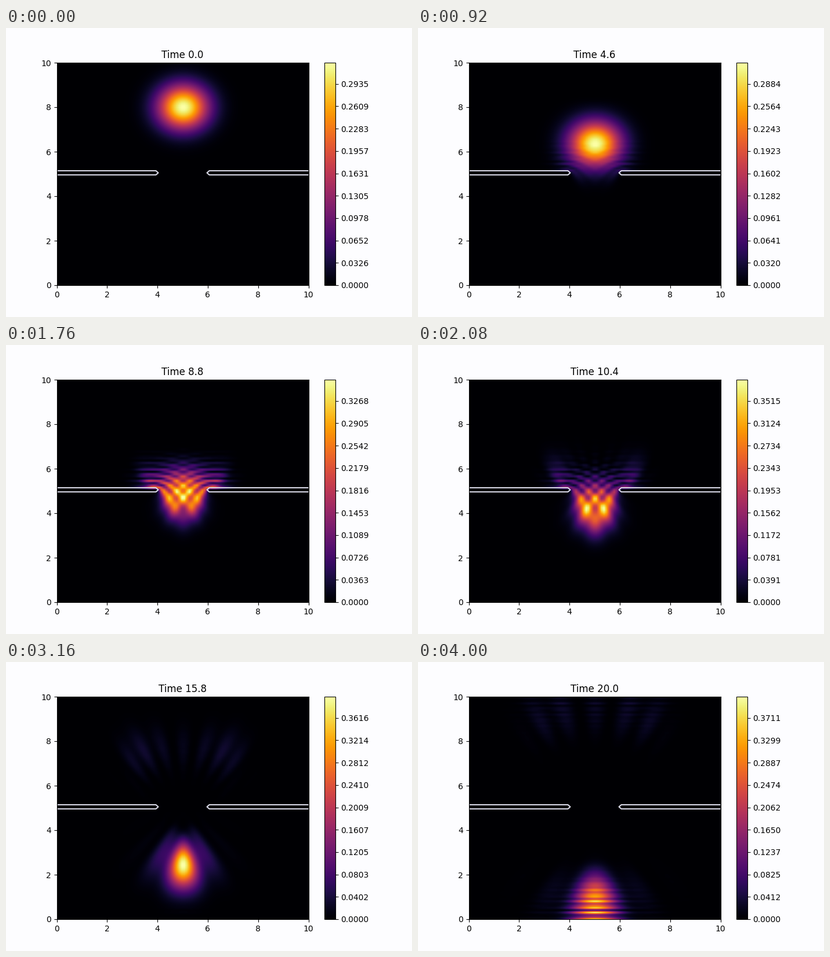
A matplotlib script for the animation above (4040 ms loop, 700 by 500 pixels).

```python
"""Wave packet passing a single slit: 2D Schroedinger equation on a grid."""
import numpy as np
import matplotlib.pyplot as plt
from matplotlib.animation import FuncAnimation

N, SIZE = 100, 10.0
FRAMES, INTERVAL, DT = 101, 40, 0.2
SUBSTEPS = 4
LEVELS = 200
HBAR_M = 0.0387            # hbar / m
K0, SIGMA = 12.0, 0.7
X0, Y0 = 5.0, 8.0

axis = np.linspace(0, SIZE, N)
dx = axis[1] - axis[0]
X, Y = np.meshgrid(axis, axis)

wall = (abs(Y - 5.05) < dx / 2) & ((X < 4) | (X > 6))
free = ~wall


def hamiltonian_step(psi, dt):
    """-i H psi dt, with psi zero on the wall and just outside the grid."""
    lap = -4 * psi
    lap[1:] += psi[:-1]
    lap[:-1] += psi[1:]
    lap[:, 1:] += psi[:, :-1]
    lap[:, :-1] += psi[:, 1:]
    return 0.5j * HBAR_M * dt / dx**2 * lap * free


def advance(psi, dt):
    """Fourth-order Taylor step."""
    term = psi
    for n in range(1, 5):
        term = hamiltonian_step(term, dt) / n
        psi = psi + term
    return psi


def total(p):
    """Trapezoid integral over the square."""
    return np.trapezoid(np.trapezoid(p, axis), axis)


def simulate():
    r2 = (X - X0)**2 + (Y - Y0)**2
    psi = np.exp(-r2 / (4 * SIGMA**2) - 1j * K0 * Y) * free
    psi /= np.sqrt(total(abs(psi)**2))
    densities = []
    for _ in range(FRAMES):
        densities.append(abs(psi)**2)
        for _ in range(SUBSTEPS):
            psi = advance(psi, DT / SUBSTEPS)
    return densities


if not hasattr(np, "trapezoid"):   # numpy < 2
    np.trapezoid = np.trapz

density = simulate()

fig, ax = plt.subplots(figsize=(7, 5), dpi=100, facecolor="#fdfdff")
half = dx / 2
image = ax.imshow(density[0], cmap="inferno", origin="lower", aspect="auto",
                  interpolation="bilinear",
                  extent=(-half, SIZE + half, -half, SIZE + half))
ax.contour(X, Y, wall.astype(float), levels=[0.08], colors="#d8d8e6",
           linewidths=1.5)
ax.set(xlim=(0, SIZE), ylim=(0, SIZE))
ax.set_xticks(range(0, 11, 2))
ax.set_yticks(range(0, 11, 2))
title = ax.set_title("Time 0.0")
bar = fig.colorbar(image, ax=ax)


def update(i):
    p = density[i]
    top = p.max()
    image.set_data(p)
    image.set_clim(0, top)
    bar.set_ticks(np.linspace(0, top, LEVELS)[::LEVELS // 10])
    title.set_text(f"Time {i * DT:.1f}")
    return image, title


anim = FuncAnimation(fig, update, frames=FRAMES, interval=INTERVAL,
                     repeat=True, blit=False)
plt.show()
```
